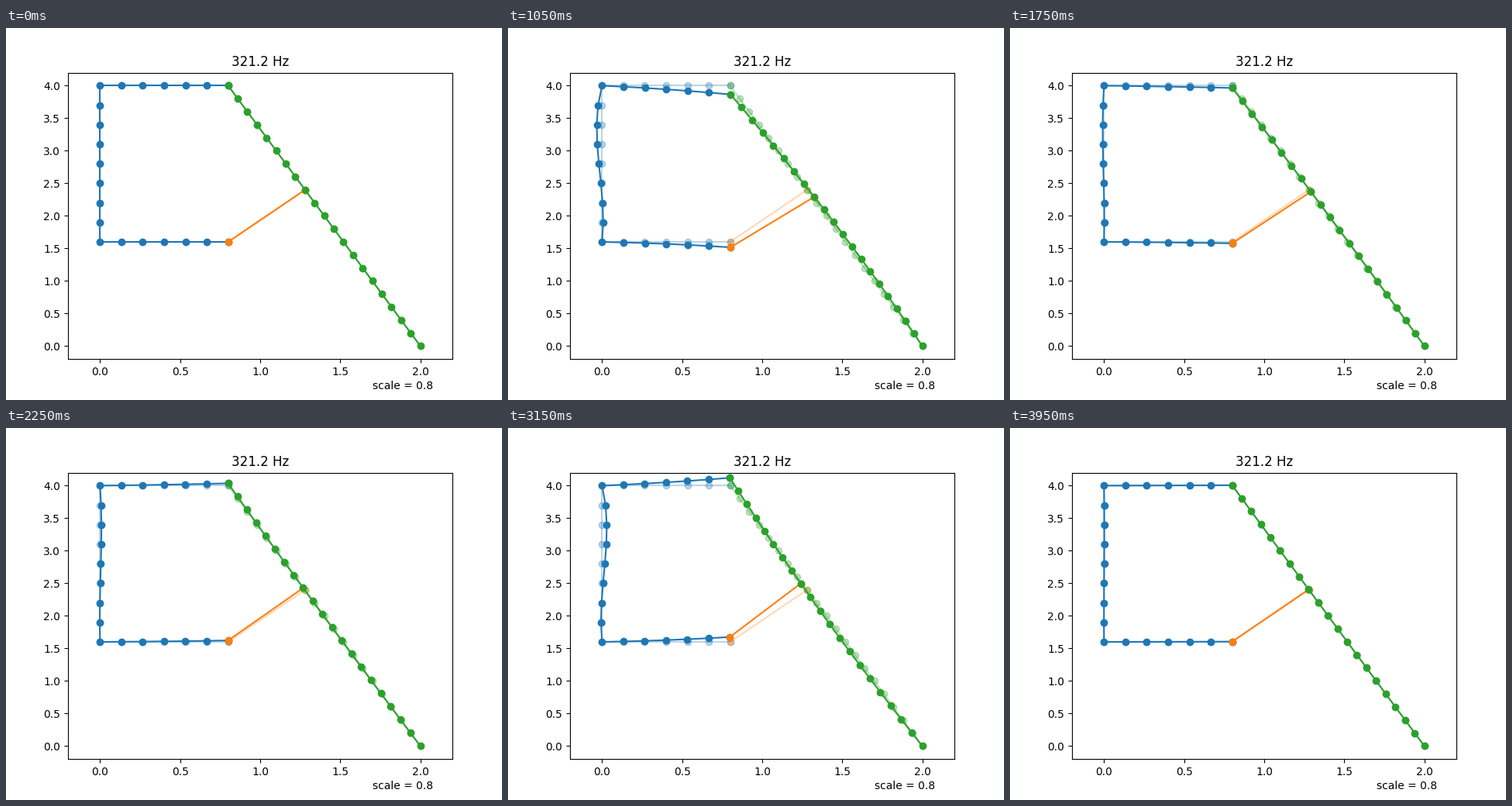
Write a matplotlib script that moves like this. It is 640 px wide and 480 px high and loops after 4 s.

```python
import numpy as np
import matplotlib.pyplot as plt
from matplotlib.animation import FuncAnimation

FRAMES = 80
BLUE, ORANGE, GREEN = "C0", "C1", "C2"


def segment(p, q, n):
    t = np.linspace(0, 1, n + 1)[:, None]
    return (1 - t) * np.array(p) + t * np.array(q)


def arm_shift(x, slope, bend):
    """Downward bending of a horizontal arm clamped to the wall."""
    return np.column_stack([0.0025 * x, -(slope * x + bend * x**2)])


# Rest shape
top = segment((0, 4), (0.8, 4), 6)
wall = segment((0, 4), (0, 1.6), 8)
bottom = segment((0, 1.6), (0.8, 1.6), 6)
strut = segment((0.8, 4), (2, 0), 20)

# Mode shape
top_u = arm_shift(top[:, 0], 0.12, 0.0714)
bottom_u = arm_shift(bottom[:, 0], 0.051, 0.0737)

s = np.linspace(0, 1, 9)
wall_u = np.column_stack([s * (1 - s) * (0.41 * s - 0.288), 0 * s])

t = np.linspace(0, 1, 21)
along = np.array([0.6, -2]) / np.hypot(0.6, 2)
normal = np.array([-along[1], along[0]])
axial = np.interp(t, [0, 0.4, 1], [0.136, 0.123, 0])
sway = (1 - t) * (0.148 * t - 0.0388)
strut_u = np.outer(axial, along) + np.outer(sway, normal)

frame_rest = np.vstack([top[::-1], wall[1:], bottom[1:]])
frame_u = np.vstack([top_u[::-1], wall_u[1:], bottom_u[1:]])
brace_rest = np.array([bottom[-1], strut[8]])
brace_u = np.array([bottom_u[-1], strut_u[8]])

parts = [
    (frame_rest, frame_u, BLUE),
    (brace_rest, brace_u, ORANGE),
    (strut, strut_u, GREEN),
]

fig, ax = plt.subplots(figsize=(6.4, 4.8), dpi=100)
ax.set_xlim(-0.2, 2.2)
ax.set_ylim(-0.2, 4.2)
ax.set_title("321.2 Hz")
fig.text(0.8, 0.03, "scale = 0.8", ha="center")

for rest, _, color in parts:
    ax.plot(*rest.T, "o-", color=color, alpha=0.3)
lines = [ax.plot(*rest.T, "o-", color=color)[0] for rest, _, color in parts]


def amplitude(i):
    """Triangle wave: 0, 1, 0, -1, 0 over one loop."""
    return np.interp(i / FRAMES, [0, 0.25, 0.75, 1], [0, 1, -1, 0])


def update(i):
    a = amplitude(i)
    for line, (rest, shift, _) in zip(lines, parts):
        line.set_data(*(rest + a * shift).T)
    return lines


anim = FuncAnimation(fig, update, frames=FRAMES, interval=50, repeat=True)
plt.show()
```
